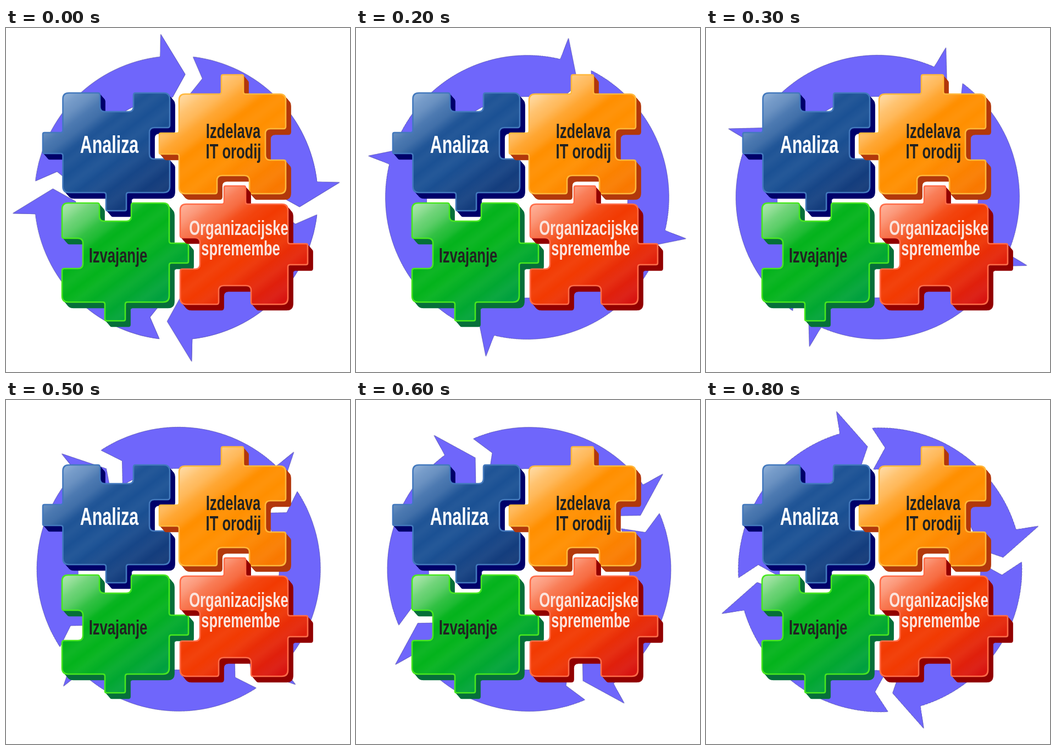
An HTML page that plays this animation: 626 px wide and 625 px high, repeating every 0.9 s.

```html
<!DOCTYPE html>
<html lang="sl">
<head>
<meta charset="utf-8">
<title>Cikel</title>
<style>
  html, body { margin: 0; width: 100%; height: 100%; overflow: hidden; background: #fff; }
  svg { display: block; width: 100%; height: 100%; }
  #cycle { fill: #6f66fb; filter: drop-shadow(.7px .9px 0 #14143c); }
  text { font: bold 37px "Liberation Sans", Arial, sans-serif; }
</style>
</head>
<body>
<svg viewBox="0 0 626 625">
  <defs></defs>
  <g id="cycle"><g id="ring"></g></g>
  <g id="pieces"></g>
  <g id="labels"></g>
</svg>
<script>
const $ = sel => document.querySelector(sel);

function add(parent, tag, attrs, text) {
  const el = document.createElementNS('http://www.w3.org/2000/svg', tag);
  for (const key in attrs) el.setAttribute(key, attrs[key]);
  if (text) el.textContent = text;
  parent.append(el);
  return el;
}

// Ring: four arrows, angles clockwise from the top.
const OUTER = 258, INNER = 183;
function polar(r, deg) {
  const a = deg * Math.PI / 180;
  return `${(r * Math.sin(a)).toFixed(2)} ${(-r * Math.cos(a)).toFixed(2)}`;
}
const arrow = `M${polar(OUTER, 6.8)}
  A${OUTER} ${OUTER} 0 0 1 ${polar(OUTER, 83.5)}
  L${polar(299, 84.6)} L${polar(225, 94.2)} L${polar(INNER, 88)}
  A${INNER} ${INNER} 0 0 0 ${polar(INNER, 6.2)}
  L${polar(222, 12.4)} Z`;
for (let q = 0; q < 4; q++) add($('#ring'), 'path', { d: arrow, transform: `rotate(${q * 90})` });

// Nine held poses, ten degrees apart, with a slight drift of the centre.
const STEPS = 9;
const poses = Array.from({ length: STEPS + 1 }, (_, i) => {
  const k = Math.min(i, STEPS - 1);
  const x = 309.75 + 0.88 * k, y = 307.2 + 0.09 * (k - 4) ** 2;
  return {
    offset: i / STEPS,
    easing: 'steps(1, end)',
    transform: `translate(${x}px, ${y}px) rotate(${k * 10}deg)`
  };
});
$('#ring').animate(poses, { duration: STEPS * 100, iterations: Infinity });

// Polygon of [x, y, radius] with softened corners.
function rounded(points) {
  const n = points.length;
  const toward = ([x, y, r], [px, py]) => {
    const t = r / Math.hypot(px - x, py - y);
    return `${x + (px - x) * t} ${y + (py - y) * t}`;
  };
  return points.map((p, i) => {
    const prev = points[(i + n - 1) % n], next = points[(i + 1) % n];
    return `${i ? 'L' : 'M'}${toward(p, prev)} Q${p[0]} ${p[1]} ${toward(p, next)}`;
  }).join(' ') + 'Z';
}

// Each side is [from, to, level]: a tab when level lies outside the box, else a notch.
function outline({ box: [x0, y0, x1, y1], top, right, bottom, left }) {
  const C = 11, E = 4;
  const tip = outside => outside ? 3 : 9;
  const across = ([a, b, y], edge, outside) =>
    [[a, edge, E], [a, y, tip(outside)], [b, y, tip(outside)], [b, edge, E]];
  const down = ([a, b, x], edge, outside) =>
    [[edge, a, E], [x, a, tip(outside)], [x, b, tip(outside)], [edge, b, E]];
  return rounded([
    [x0, y0, C], ...across(top, y0, top[2] < y0),
    [x1, y0, C], ...down(right, x1, right[2] > x1),
    [x1, y1, C], ...across(bottom, y1, bottom[2] > y1).reverse(),
    [x0, y1, C], ...down(left, x0, left[2] < x0).reverse()
  ]);
}

const pieces = [
  { box: [103.5, 118, 298, 299], top: [171, 232, 152], right: [181, 238, 261],
    bottom: [182, 219, 332], left: [190, 228, 67],
    edge: '#4379bd', side: '#00006a', fill: ['#8fb0d8', '#1b5194', '#123877'] },
  { box: [315, 120, 509, 301], top: [392, 432, 85], right: [183, 240, 472],
    bottom: [384, 443, 268], left: [191, 229, 279],
    edge: '#ffb83c', side: '#b2380c', fill: ['#ffdca6', '#ff8f00', '#f87600'] },
  { box: [102, 318, 297, 498], top: [170, 228, 351], right: [391, 427, 332],
    bottom: [180, 217, 532], left: [382, 437, 140],
    edge: '#48e81e', side: '#06703a', fill: ['#b2e8b2', '#04b31c', '#009f40'] },
  { box: [317, 320, 513, 502], top: [397, 436, 287], right: [392, 430, 549],
    bottom: [387, 446, 468], left: [381, 438, 353],
    edge: '#ff6c48', side: '#920000', fill: ['#ffb8a2', '#f23a02', '#d81410'] }
];

function gradient(id, [x1, y1, x2, y2], stops, extra) {
  const g = add($('defs'), 'linearGradient',
    { id, x1, y1, x2, y2, gradientUnits: 'userSpaceOnUse', ...extra });
  for (const [offset, color, opacity = 1] of stops)
    add(g, 'stop', { offset, 'stop-color': color, 'stop-opacity': opacity });
}

gradient('sheen', [0, 0, 21, 28],
  [[0, '#fff', 0], [.45, '#fff', .04], [.55, '#fff', .04], [1, '#fff', 0]],
  { spreadMethod: 'repeat' });

const DEPTH = 10;
pieces.forEach((piece, i) => {
  const d = outline(piece), [light, mid, dark] = piece.fill, [x, y] = piece.box;
  const g = add($('#pieces'), 'g');
  gradient('face' + i, [x, y, x + 150, y + 200], [[0, light], [.38, mid], [.6, mid], [1, dark]]);
  for (let s = DEPTH; s > 0; s--)
    add(g, 'path', { d, fill: piece.side, stroke: piece.side, transform: `translate(${s * .93} ${s * 1.07})` });
  add(g, 'path', { d, fill: `url(#face${i})` });
  add(g, 'path', { d, fill: 'url(#sheen)', stroke: piece.edge, 'stroke-width': 2.6 });
});

// One condensed face for all labels.
const NARROW = .692;
function label(text, x, y, fill, size = 37) {
  add($('#labels'), 'text', {
    transform: `translate(${x} ${y}) scale(${NARROW} 1)`,
    'text-anchor': 'middle', fill, style: `font-size:${size}px`
  }, text);
}
label('Analiza', 188, 227, '#fff', 44);
label('Izdelava', 413.5, 200, '#222');
label('IT orodij', 414, 237, '#222');
label('Izvajanje', 204, 426, '#222');
label('Organizacijske', 423.5, 376, '#fbe4de');
label('spremembe', 427, 413, '#fbe4de');
</script>
</body>
</html>
```
